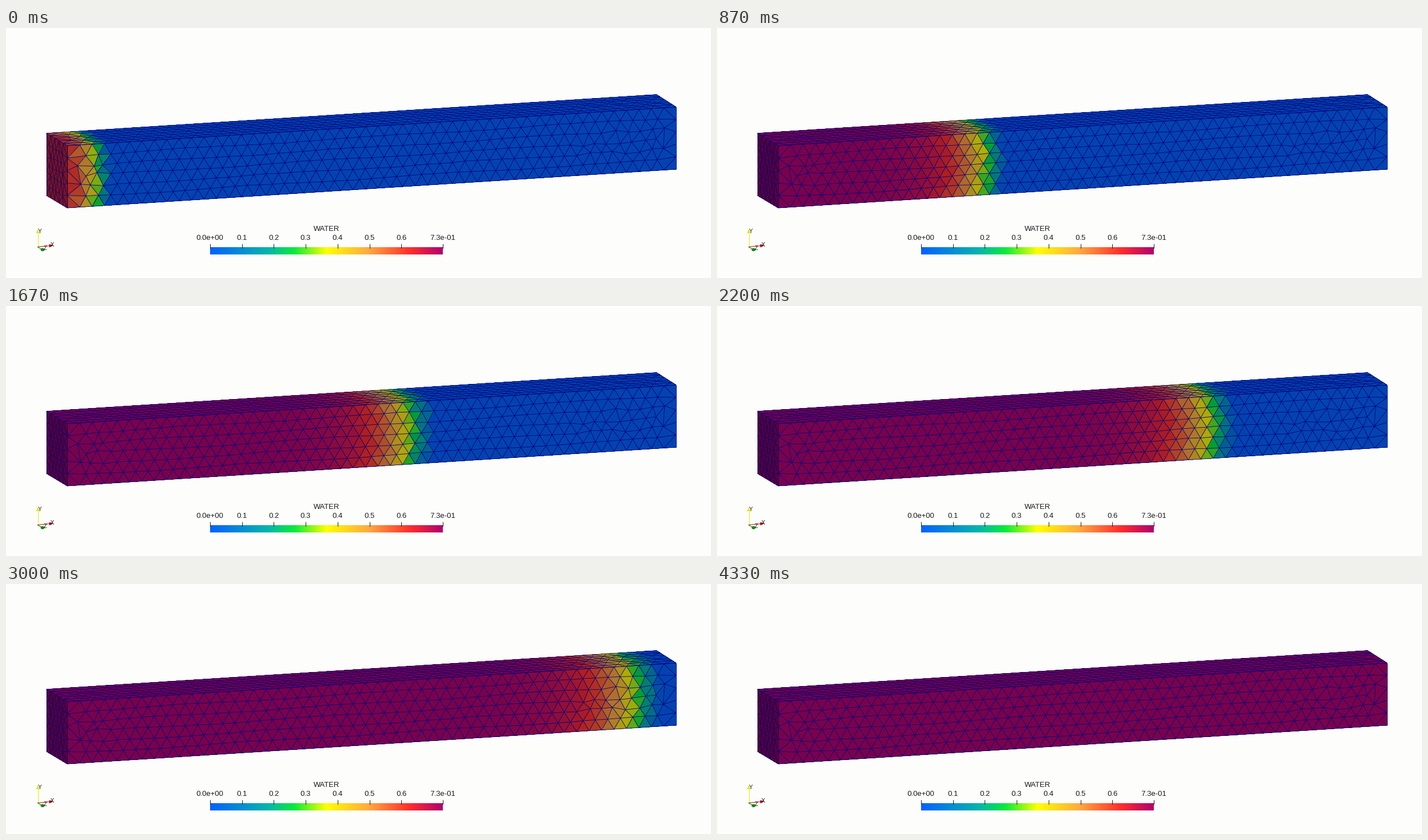
Write a matplotlib script that moves like this. It is 1254 px wide and 446 px high and loops after 4390 ms.

```python
import numpy as np
import matplotlib.pyplot as plt
from matplotlib.animation import FuncAnimation
from matplotlib.collections import LineCollection, PolyCollection
from matplotlib.colors import LinearSegmentedColormap
from matplotlib.patches import Ellipse
from matplotlib.tri import Triangulation

W, H, DPI = 1254, 446, 100
FRAMES, LOOP_MS = 66, 4390
PX = 72 / DPI
LENGTH, SIDE = 1083, 111
VMAX = 0.73
ROWS, COLS = 6, 49
PITCH = LENGTH / COLS
ROW_H = SIDE / ROWS
INK = "#181818"
EDGE = (0, 0, .5)
rng = np.random.default_rng(7)

cmap = LinearSegmentedColormap.from_list("water", [
    (0, "#0561ff"), (.25, "#05b6aa"), (.36, "#05eb3c"), (.5, "#ffff00"),
    (.68, "#ffaa41"), (.86, "#ff2d2d"), (1, "#b0036e")], N=512)


def saturation(x, n):
    """Steep wet front whose tail stretches as it advances."""
    front = 20.3 * n + 143 - 67 * np.exp(-n / 4)
    spread = 42 + 5 * np.sqrt(n)
    behind = np.maximum(front - x, 0) / spread
    return VMAX * (1 - np.exp(-behind ** 1.2))


def side_points():
    """Staggered rows on a long face, irregular in the middle of both ends."""
    pts = [(u, w) for u in (0, LENGTH) for w in np.linspace(0, SIDE, 6)]
    for r in range(ROWS + 1):
        w = r * ROW_H
        for i in range(COLS + 1):
            u = (i + r % 2 / 2) * PITCH
            if r in (0, ROWS):
                if 0 < i < COLS:
                    pts.append((u, w))
            elif 17 < u < LENGTH - 17:
                near_end = u < 70 or u > 915
                shake = 4 if near_end and 1 < r < ROWS - 1 else .5
                du, dw = rng.uniform(-shake, shake, 2)
                pts.append((u + du, w + dw + 1.2 * np.sin(u / 55 + r)))
    return np.array(pts)


def end_points():
    """Nodes of the square end face."""
    edge = np.linspace(0, SIDE, 6)
    pts = [(a, b) for a in edge for b in edge
           if a in (0, SIDE) or b in (0, SIDE)]
    for r in range(1, ROWS):
        for i in range(5):
            du, dw = rng.uniform(-2, 2, 2)
            pts.append((17 + (i + r % 2 / 2) * 17.5 + du, r * ROW_H + dw))
    return np.array(pts)


def project(u, w, d):
    """Along the bar, down and into depth -> stage pixels."""
    d = d / SIDE
    x = 109 + u + d * (-37 + 2 * u / LENGTH)
    y = 210 + w - 69 / LENGTH * u - 22.3 * d
    return np.stack([x, y], axis=-1)


fig = plt.figure(figsize=(W / DPI, H / DPI), dpi=DPI, facecolor="#fdfdfc")
ax = fig.add_axes([0, 0, 1, 1])
ax.axis("off")

faces = []


def add_face(pts, place, light, edge_width, along=True):
    tri = Triangulation(pts[:, 0], pts[:, 1])
    xy = place(pts[:, 0], pts[:, 1])
    mid = pts[tri.triangles].mean(axis=1)
    x = np.zeros(len(mid))
    if along:
        lag = 9 * ((2 * mid[:, 1] / SIDE - 1) ** 2 - .3)
        x = np.maximum(mid[:, 0] + lag + rng.normal(0, 2.5, len(mid)), 1)
    fill = PolyCollection(xy[tri.triangles], edgecolors="none",
                          antialiaseds=False)
    ax.add_collection(fill)
    ax.add_collection(LineCollection(xy[tri.edges], colors=[EDGE],
                                     linewidths=edge_width * PX))
    faces.append((fill, x, light))


add_face(end_points(), lambda u, w: project(0 * u, w, u), .5, .75, False)
add_face(side_points(), lambda u, d: project(u, 0 * u, d), .67, .7)
add_face(side_points(), lambda u, w: project(u, w, 0 * u), .69, .85)


def label(x, y, text, size=13.2):
    ax.text(x, y, text, family="Liberation Sans", fontsize=size * PX,
            color=INK, ha="center", va="center_baseline")


def line(xs, ys, color, width=1):
    ax.plot(xs, ys, color=color, lw=width * PX, solid_capstyle="butt")


def draw_legend():
    left, right = 363, 777
    ax.imshow(np.linspace(0, 1, right - left)[None], cmap=cmap,
              aspect="auto", extent=(left, right, 404, 391),
              interpolation="nearest")
    label(570, 357.5, "WATER")
    for value in [*np.arange(7) / 10, VMAX]:
        x = left + (right - left) * value / VMAX
        at_end = value in (0, VMAX)
        line([x, x], [384.5, 393], INK)
        label(x, 374, f"{value:.1e}" if at_end else f"{value:.1f}")


def draw_axes_marker():
    line([56.5, 56.5], [390, 364], "#e6e600")
    ax.fill([53.5, 59.5, 56.5], [366, 366, 359], color="#e6e600", lw=0)
    line([56, 78], [390.5, 388.5], "#c00000")
    ax.fill([77, 77, 84], [385.5, 391.5, 388], color="#a00000", lw=0)
    line([56, 64], [390.5, 395], "#007a00")
    ax.add_patch(Ellipse((65, 395.5), 7, 5.5, color="#00900a", lw=0))
    label(60, 362.5, "Y", 10)
    label(82.5, 385.5, "X", 10)
    label(69.5, 392.5, "Z", 10)


draw_legend()
draw_axes_marker()
ax.set_xlim(0, W)
ax.set_ylim(H, 0)


def update(n):
    for fill, x, light in faces:
        rgb = cmap(saturation(x, n) / VMAX)[:, :3]
        fill.set_facecolor(rgb * light)
    return [fill for fill, _, _ in faces]


anim = FuncAnimation(fig, update, frames=FRAMES, interval=LOOP_MS / FRAMES,
                     repeat=True, repeat_delay=0, blit=False)
plt.show()
```
